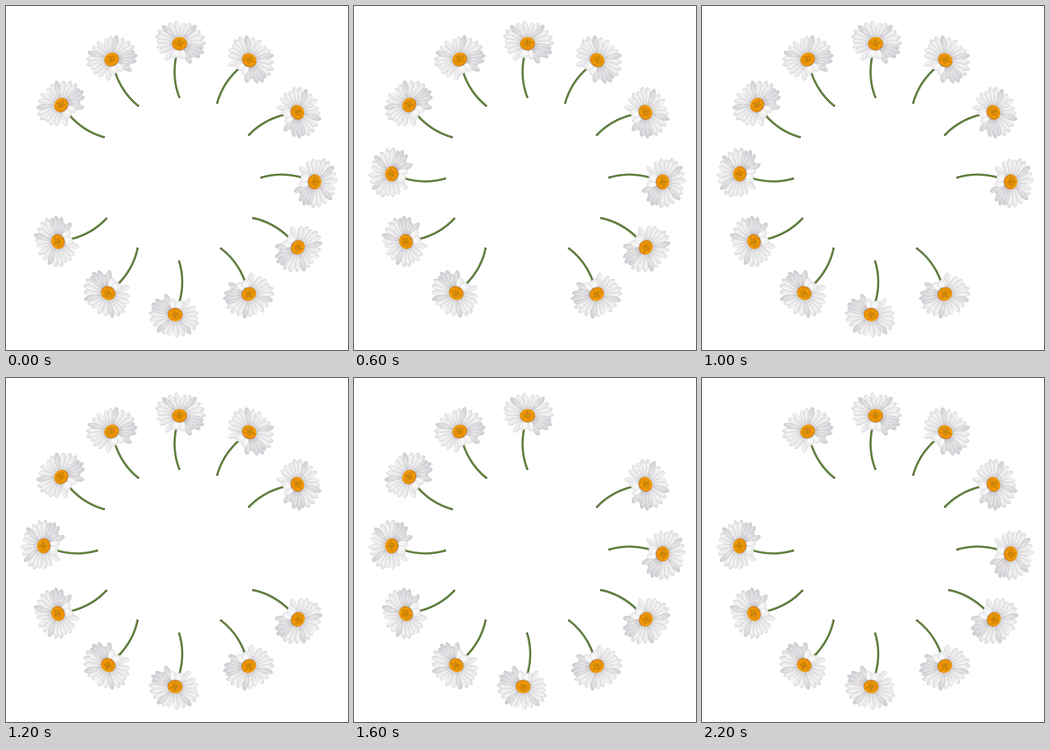
Animation, 745 px wide and 751 px high, one loop 2400 ms. Source, as an HTML page:

```html
<!DOCTYPE html>
<html lang="en">
<head>
<meta charset="utf-8">
<title>Daisy ring</title>
<style>
  html, body { margin: 0; width: 100%; height: 100%; overflow: hidden; background: #fff; }
  svg { display: block; width: 100%; height: 100%; }
</style>
</head>
<body>
<svg id="stage" viewBox="0 0 745 751">
  <defs>
    <linearGradient id="lit" gradientUnits="userSpaceOnUse" x1="0" y1="-10" x2="0" y2="-57">
      <stop offset="0" stop-color="#c3bfc2"/>
      <stop offset=".3" stop-color="#e9e8e9"/>
      <stop offset=".7" stop-color="#f4f3f4"/>
      <stop offset="1" stop-color="#e2e0e3"/>
    </linearGradient>
    <linearGradient id="dim" gradientUnits="userSpaceOnUse" x1="0" y1="-10" x2="0" y2="-57">
      <stop offset="0" stop-color="#b5b1b5"/>
      <stop offset=".4" stop-color="#e3e1e4"/>
      <stop offset="1" stop-color="#d3d0d5"/>
    </linearGradient>
    <linearGradient id="near" gradientUnits="userSpaceOnUse" x1="0" y1="-10" x2="0" y2="-32">
      <stop offset="0" stop-color="#dedcde"/>
      <stop offset=".4" stop-color="#fbfbfb"/>
      <stop offset="1" stop-color="#f1f0f2"/>
    </linearGradient>
    <radialGradient id="disc" cx=".48" cy=".44" r=".56">
      <stop offset="0" stop-color="#c98308"/>
      <stop offset=".4" stop-color="#dd8e07"/>
      <stop offset=".68" stop-color="#f8a005"/>
      <stop offset="1" stop-color="#d97a02"/>
    </radialGradient>
    <g id="daisy"></g>
  </defs>
</svg>
<script>
const NS = "http://www.w3.org/2000/svg";
const STEP = 200;
const FIRST_HIDDEN = 9;

// Clockwise from twelve o'clock: disc centre and tilt in degrees
const RING = [
  [378, 82, 0], [530, 118, 36.5], [635, 232, 64.7], [672.5, 384, 94.4],
  [636, 527, 123], [529, 629, 148.4], [368.5, 674, 184], [222.5, 627, 213],
  [113, 514.5, 244.2], [82, 366.5, 274.8], [120, 216, 306.7], [230, 116.5, 330]
];

// Angle from straight up and length
const PETALS = [
  [-8, 50], [14, 47], [28, 50], [-26, 50], [42, 54], [-43, 54], [59, 53],
  [-59, 55], [75, 56], [-72, 55], [89, 57], [-84, 49], [101, 53], [111, 57],
  [-98, 50], [124, 54], [-114, 47], [135, 42], [-140, 47], [150, 50],
  [-157, 34], [165, 35], [-168, 31]
];

function add(parent, tag, attrs) {
  const node = document.createElementNS(NS, tag);
  for (const key in attrs) node.setAttribute(key, attrs[key]);
  return parent.appendChild(node);
}

function randomizer(seed) {
  return () => (seed = (seed * 16807) % 2147483647) / 2147483647;
}

function petalSide(length, w) {
  return `C${w * .6} ${-length * .35} ${w * 1.15} ${-length * .6} ${w} ${-length * .82}` +
    `C${w * .8} ${-length * .95} ${w * .3} ${-length} 0 ${-length}`;
}

function drawPetal(parent, [angle, length]) {
  const short = length < 38;
  const shaded = (angle > 95 && angle < 155) || angle === 42 || angle === -43;
  const fill = short ? "near" : shaded ? "dim" : "lit";
  const w = short ? 6.6 : 5.5;
  const group = add(parent, "g", { transform: `rotate(${angle})` });
  const half = `M0 -4${petalSide(length, w)}`;
  const whole = `${half}C${-w * .3} ${-length} ${-w * .8} ${-length * .95} ${-w} ${-length * .82}` +
    `C${-w * 1.15} ${-length * .6} ${-w * .6} ${-length * .35} 0 -4Z`;
  add(group, "path", { d: whole, fill: `url(#${fill})`, stroke: "#c4c1c6", "stroke-width": .65 });
  const side = angle < 0 ? "scale(-1 1)" : "";
  add(group, "path", { d: half + "Z", transform: side, fill: "#a9a5ae", opacity: short ? .06 : .15 });
  add(group, "path", {
    d: `M-1.6 -14L-2.2 ${-length * .88}M1.4 -14L2 ${-length * .86}`,
    fill: "none", stroke: "#fff", "stroke-width": .8, opacity: .6
  });
}

function drawStem(parent) {
  const d = "M-7 27Q-17 75 0 118";
  const line = (stroke, width, shift) => add(parent, "path", {
    d, fill: "none", stroke, "stroke-width": width, transform: `translate(${shift} 0)`
  });
  line("#36521f", 4.4, 0);
  line("#587a34", 2.8, .3);
  line("#8aa85a", 1.1, .6);
  add(parent, "path", { d: "M-2.2 118.4L2 116.8", stroke: "#4b4a2a", "stroke-width": 1.5 });
}

function drawDisc(parent) {
  const random = randomizer(71);
  add(parent, "ellipse", { cy: 1, rx: 17, ry: 15.2, fill: "#77654f", opacity: .3 });
  add(parent, "ellipse", { rx: 16.2, ry: 14.3, fill: "url(#disc)" });
  for (let i = 0; i < 170; i++) {
    const r = Math.sqrt(random()) * .97;
    const a = random() * Math.PI * 2;
    const dark = random() < (r < .5 ? .65 : .45);
    add(parent, "circle", {
      cx: (Math.cos(a) * r * 16).toFixed(2),
      cy: (Math.sin(a) * r * 14).toFixed(2),
      r: .65, fill: dark ? "#a75c03" : "#ffb51c", opacity: .65
    });
  }
}

const daisy = document.getElementById("daisy");
drawStem(daisy);
PETALS.forEach(petal => drawPetal(daisy, petal));
drawDisc(daisy);

const stage = document.getElementById("stage");
const flowers = RING.map(([x, y, tilt]) => add(stage, "use", {
  href: "#daisy", transform: `translate(${x} ${y}) rotate(${tilt})`
}));

// The gap travels counter-clockwise, one place per step
function render(time) {
  const count = flowers.length;
  const step = Math.floor(time / STEP) % count;
  const hidden = (FIRST_HIDDEN - step + count) % count;
  flowers.forEach((flower, i) => flower.setAttribute("visibility", i === hidden ? "hidden" : "visible"));
}

const start = performance.now();
function tick() {
  render(performance.now() - start);
  requestAnimationFrame(tick);
}
tick();
</script>
</body>
</html>
```
